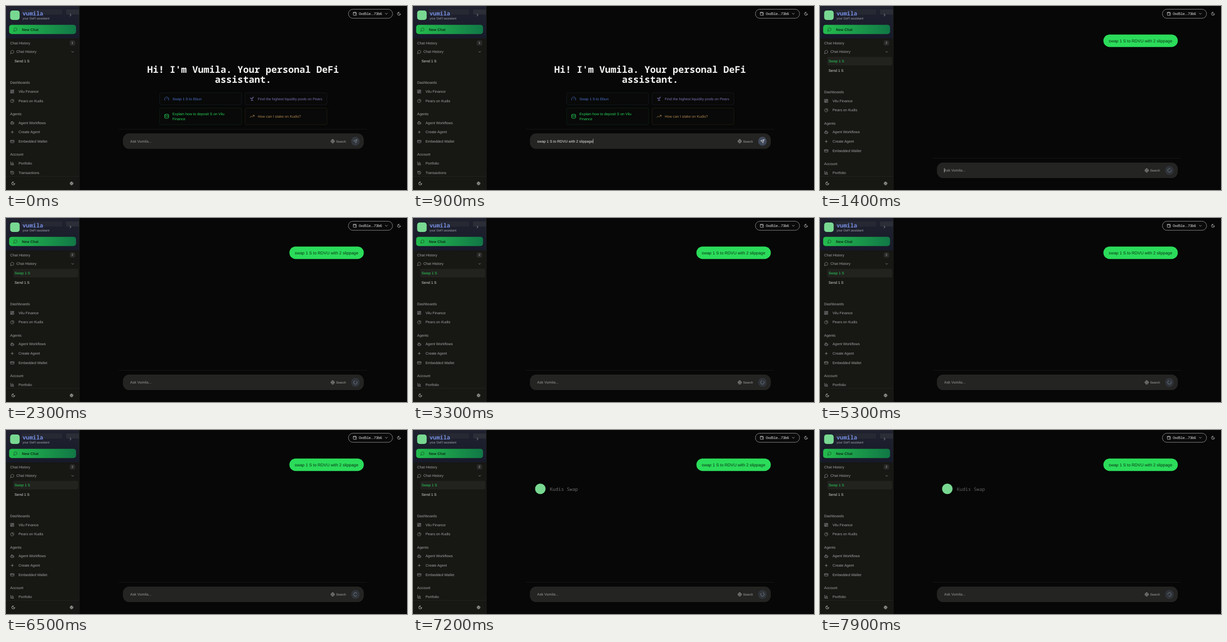
An HTML page for the animation above (8000 ms loop, 800x369 px).

```html
<!DOCTYPE html>
<html lang="en">
<head>
<meta charset="utf-8">
<title>Assistant chat</title>
<style>
  html, body { margin: 0; width: 100%; height: 100%; overflow: hidden; background: #060706; }
  svg { display: block; width: 100vw; height: 100vh; }
  text { font-family: "Liberation Sans", Arial, sans-serif; text-rendering: geometricPrecision; white-space: pre; }
  .mono { font-family: "Noto Sans Mono", "Liberation Mono", monospace; }
  .icon { fill: none; stroke-width: 2; stroke-linecap: round; stroke-linejoin: round; }
</style>
</head>
<body>
<svg id="stage" viewBox="0 0 800 369">
  <defs>
    <linearGradient id="button"><stop stop-color="#24bd4e"/><stop offset="1" stop-color="#117746"/></linearGradient>
    <linearGradient id="header" x2="0" y2="1"><stop stop-color="#20222f"/><stop offset="1" stop-color="#171a29"/></linearGradient>
    <clipPath id="scroll"><rect y="65" width="146" height="276"/></clipPath>
  </defs>
  <g id="scene"></g>
</svg>
<script>
const LOOP = 8000, STEP = 100, SENT = 1400, REPLY = 6600;
const SM = 7.29, XS = 6.25, MD = 8.33;
const MUTED = '#a3a3a5', WHITE = '#ededed', GREEN = '#27d158';
const PROMPT = 'swap 1 S to RDVU with 2 slippage';

// Icon outlines on a 24 unit grid
const ICONS = {
  chat: 'M7.9 20A9 9 0 1 0 4 16.1L2 22Z',
  right: 'm9 18 6-6-6-6',
  down: 'm6 9 6 6 6-6',
  grid: 'M3 3h7v9H3zM14 3h7v5h-7zM14 12h7v9h-7zM3 16h7v5H3z',
  pie: 'M21 12c.6 0 1-.4.95-.95A10 10 0 0 0 13 2c-.6 0-1 .4-1 1v8a1 1 0 0 0 1 1zM21.2 15.9A10 10 0 1 1 8 2.8',
  bot: 'M12 8V4H8M6 8h12a2 2 0 0 1 2 2v8a2 2 0 0 1-2 2H6a2 2 0 0 1-2-2v-8a2 2 0 0 1 2-2M2 14h2M20 14h2M15 13v2M9 13v2',
  plus: 'M5 12h14M12 5v14',
  card: 'M4 5h16a2 2 0 0 1 2 2v10a2 2 0 0 1-2 2H4a2 2 0 0 1-2-2V7a2 2 0 0 1 2-2M2 10h20',
  chart: 'M3 3v16a2 2 0 0 0 2 2h16M8 17v-6M13 17V5M18 17V9',
  history: 'M3 12a9 9 0 1 0 9-9 9.75 9.75 0 0 0-6.7 2.7L3 8M3 3v5h5M12 7v5l4 2',
  moon: 'M12 3a6 6 0 0 0 9 9 9 9 0 1 1-9-9Z',
  gear: 'M12 5a7 7 0 1 0 .01 0M12 9a3 3 0 1 0 .01 0M12 2v3M12 19v3M2 12h3M19 12h3M4.9 4.9 7 7M17 17l2.1 2.1M4.9 19.1 7 17M17 7l2.1-2.1',
  wallet: 'M19 7V4a1 1 0 0 0-1-1H5a2 2 0 0 0 0 4h15a1 1 0 0 1 1 1v4h-3a2 2 0 0 0 0 4h3v4a1 1 0 0 1-1 1H5a2 2 0 0 1-2-2V5',
  gauge: 'm12 14 4-4M3.3 19a10 10 0 1 1 17.4 0',
  sprout: 'M7 20h10M10 20c5.5-2.5.8-6.4 3-10M9.5 9.4c1.1.8 1.8 2.2 2.3 3.7-2 .4-3.5.4-4.8-.3-1.2-.6-2.3-1.9-3-4.2 2.8-.5 4.4 0 5.5.8M14.1 6a7 7 0 0 0-1.1 4c1.9-.1 3.3-.6 4.3-1.4 1-1 1.6-2.3 1.7-4.6-2.7.1-4 1-4.9 2',
  database: 'M3 5a9 3 0 1 0 18 0a9 3 0 1 0-18 0M3 5v14a9 3 0 0 0 18 0V5M3 12a9 3 0 0 0 18 0',
  trend: 'm22 7-8.5 8.5-5-5L2 17M16 7h6v6',
  globe: 'M12 2a10 10 0 1 0 .01 0M12 2a14.5 14.5 0 0 0 0 20 14.5 14.5 0 0 0 0-20M2 12h20',
  send: 'M14.5 21.7a.5.5 0 0 0 .9 0l6.5-19a.5.5 0 0 0-.6-.6l-19 6.5a.5.5 0 0 0 0 .9l7.9 3.2a2 2 0 0 1 1.1 1.1zM21.9 2.1 10.9 13.1',
  loader: 'M21 12a9 9 0 1 1-6.2-8.6'
};

// y is the middle of the capitals
const text = (x, y, str, fill = MUTED, size = SM, attrs = '') =>
  `<text x="${x}" y="${y + size * .36}" fill="${fill}" font-size="${size}" ${attrs}>${str}</text>`;
const box = (x, y, w, h, r, fill, stroke = 'none') =>
  `<rect x="${x}" y="${y}" width="${w}" height="${h}" rx="${r}" fill="${fill}" stroke="${stroke}" stroke-width=".7"/>`;
const icon = (name, x, y, color = MUTED, size = MD, turn = 0) =>
  `<path class="icon" d="${ICONS[name]}" stroke="${color}" transform="translate(${x} ${y}) rotate(${turn}) scale(${size / 24}) translate(-12 -12)"/>`;
const group = (body, attrs) => `<g ${attrs}>${body}</g>`;
const clamp = v => Math.min(1, Math.max(0, v));

function menu() {
  const row = (y, name, label) => icon(name, 12.5, y + .3) + text(25, y, label);
  return text(8.3, 153.8, 'Dashboards') +
    row(171.2, 'grid', 'Vilu Finance') +
    row(190, 'pie', 'Pears on Kudis') +
    text(8.3, 216.2, 'Agents') +
    row(234, 'bot', 'Agent Workflows') +
    row(252.6, 'plus', 'Create Agent') +
    row(271.4, 'card', 'Embedded Wallet') +
    text(8.3, 297.6, 'Account') +
    row(315.3, 'chart', 'Portfolio') +
    row(334, 'history', 'Transactions');
}

function sidebar(sent) {
  const shift = sent ? 18.75 : 0;
  const list = text(8.3, 74, 'Chat History') +
    box(127.2, 69, 10.6, 10.2, 2.5, '#2a2a29') +
    text(132.5, 74.2, sent ? 2 : 1, '#b5b5b5', XS, 'text-anchor="middle"') +
    icon('chat', 12.5, 92) + text(20.8, 91.7, 'Chat History') + icon('down', 133, 92) +
    (sent ? box(14.5, 102, 129.5, 17, 3, '#22221f') + text(17, 110.4, 'Swap 1 S', GREEN) : '') +
    text(17, 110.4 + shift, 'Send 1 S', '#d6d6d6') +
    group(menu(), `transform="translate(0 ${shift})"`);
  return box(0, 0, 146, 369, 0, '#171714') +
    box(0, 0, 146, 65, 0, 'url(#header)') +
    box(30, 7, 82, 10, 0, '#262833') + box(120, 7, 26, 10, 0, '#2b2d37') +
    box(8.3, 9, 19, 19, 5, '#78d891') +
    text(33, 14.8, 'vumila', '#738bdc', 11.46, 'class="mono" font-weight="700"') +
    text(33, 25, 'your DeFi assistant', '#a4a5ad', XS) +
    icon('right', 128.7, 18, '#dddddf') +
    box(6.3, 37.7, 133.4, 18.6, 5, 'url(#button)') +
    icon('chat', 19, 47, '#0c3119') +
    text(31.8, 47, 'New Chat', '#0c3119', SM, 'font-weight="700"') +
    group(list, 'clip-path="url(#scroll)"') +
    box(0, 341, 146, .6, 0, '#2b2b29') +
    icon('moon', 14.5, 355.8, WHITE) + icon('gear', 130.8, 355.8, WHITE) +
    box(145.8, 0, .6, 369, 0, '#2d2d2b');
}

function topBar() {
  return box(683, 6.5, 88.3, 18.2, 9.1, '#090a09', '#b9b9b9') +
    icon('wallet', 696, 15.6, WHITE) +
    text(704, 15.6, '0xd51e...73b6', WHITE) +
    icon('down', 758.8, 15.6, WHITE) + icon('moon', 784, 15.6, WHITE);
}

function home() {
  const title = (y, str) => text(473, y, str, '#f3f3f1', 18.75, 'class="mono" font-weight="700" text-anchor="middle"');
  const card = (x, y, h, name, color, edge, ...lines) =>
    box(x, y, 163.5, h, 3.2, '#080908', edge) +
    icon(name, x + 14, y + h / 2, color, 10.4) +
    lines.map((line, i) => text(x + 25.4, y + h / 2 + (i - (lines.length - 1) / 2) * 10.4, line, color)).join('');
  return title(126.8, "Hi! I'm Vumila. Your personal DeFi") + title(147.6, 'assistant.') +
    card(306.5, 174, 24, 'gauge', '#4d70cc', '#182030', 'Swap 1 S to Ebun') +
    card(476.8, 174, 24, 'sprout', '#7f70b4', '#211d2f', 'Find the highest liquidity pools on Pears') +
    card(306.5, 204.5, 33.5, 'database', GREEN, '#12291a', 'Explain how to deposit S on Vilu', 'Finance') +
    card(476.8, 204.5, 33.5, 'trend', '#b08452', '#2f2417', 'How can I stake on Kudis?');
}

function inputBar(t, sent) {
  const typed = t >= 200 && !sent;
  const caretOn = typed ? t < 400 || t >= 900 : sent && t < SENT + 500;
  const button = sent
    ? box(688.7, 262.2, 16.8, 18, 8.4, '#30343a') + icon('loader', 697.1, 271.2, '#818b98', 9.4, (t - SENT) * .36)
    : box(688.7, 262.2, 16.8, 18, 8.4, typed ? '#40495a' : '#33383f') + icon('send', 697.1, 271.2, typed ? '#fff' : '#8d939a');
  const body = box(225, 246.8, 495, .6, 0, '#20201f') +
    box(233.2, 255.6, 480.6, 31, 12.5, '#242423') +
    text(247.8, 271, typed ? PROMPT : 'Ask Vumila...', typed ? '#ebebeb' : '#9b9b9b') +
    (caretOn ? box(typed ? 358.9 : 247.7, 266.6, .7, 8.8, 0, '#eee') : '') +
    icon('globe', 651.8, 271.2, '#b0b0b0') + text(658.5, 271.3, 'Search', '#a8a8a8', XS) + button;
  return group(body, `transform="translate(0 ${sent ? 58.5 : 0})"`);
}

function conversation(t) {
  const bubble = box(565.4, 57.2, 148.4, 25, 12.5, '#2bdc5a') + text(576, 69.8, PROMPT, '#0b3317', MD);
  if (t < REPLY) return bubble;
  const pulse = .75 + .25 * Math.cos((t - REPLY) / 1000 * Math.PI);
  const reply = '<circle cx="254" cy="118" r="10.5" fill="#78d891"/>' +
    text(273, 118.8, 'Kudis Swap', '#9c9c9c', 9.375, `class="mono" opacity="${pulse}"`);
  return bubble + group(reply, `opacity="${clamp((t - REPLY) / 400)}"`);
}

const scene = document.getElementById('scene');
let shown = -1;
function draw(now) {
  const t = Math.floor(now % LOOP / STEP) * STEP;
  if (t !== shown) {
    const sent = t >= SENT;
    scene.innerHTML = sidebar(sent) + topBar() + (sent ? conversation(t) : home()) + inputBar(t, sent);
    shown = t;
  }
  requestAnimationFrame(draw);
}
draw(performance.now());
</script>
</body>
</html>
```
